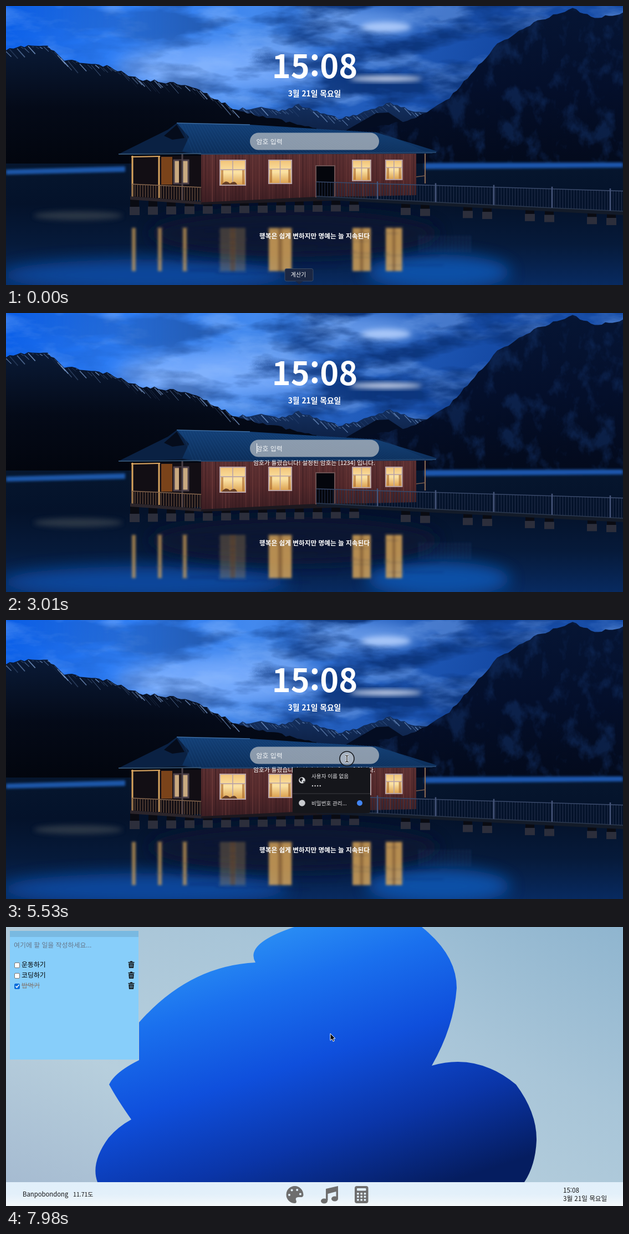
Write an HTML page that moves like this. It is 1113x503 px and loops after 8 s.

```html
<!DOCTYPE html>
<html lang="ko">
<head>
<meta charset="utf-8">
<style>
html, body { margin: 0; width: 100%; height: 100%; overflow: hidden; background: #061428; }
svg { position: absolute; left: 0; top: 0; width: 1113px; height: 503px; will-change: transform; }
text { font-family: "Noto Sans CJK KR", "Noto Sans KR", "Noto Sans", sans-serif; }
</style>
</head>
<body>
<svg id="photo" viewBox="0 0 1113 503" xmlns="http://www.w3.org/2000/svg"></svg>
<svg id="stage" viewBox="0 0 1113 503" xmlns="http://www.w3.org/2000/svg"></svg>
<script>
const LOOP = 8000, STEP = 70, LOGIN = 6860;
const KEY_GAP = 210, KEYS = 4;

let seed = 11;
const rnd = () => (seed = (seed * 16807) % 2147483647) / 2147483647;
const range = (n, fn) => Array.from({ length: n }, (_, i) => fn(i)).join('');
const lerp = (a, b, p) => a + (b - a) * p;
const rect = (x, y, w, h, fill, more = '') =>
  `<rect x="${x}" y="${y}" width="${w}" height="${h}" fill="${fill}" ${more}/>`;
const poly = (pts, fill, more = '') => `<polygon points="${pts}" fill="${fill}" ${more}/>`;
const path = (d, fill, more = '') => `<path d="${d}" fill="${fill}" ${more}/>`;
const line = (x1, y1, x2, y2, stroke, w = 1, more = '') =>
  `<path d="M${x1} ${y1}L${x2} ${y2}" stroke="${stroke}" stroke-width="${w}" ${more}/>`;
const ellipse = (x, y, rx, ry, fill, more = '') =>
  `<ellipse cx="${x}" cy="${y}" rx="${rx}" ry="${ry}" fill="${fill}" ${more}/>`;
const circle = (x, y, r, fill, more) => ellipse(x, y, r, r, fill, more);
const text = (str, x, y, size, fill = '#fff', more = '') =>
  `<text x="${x}" y="${y}" font-size="${size}" fill="${fill}" ${more}>${str}</text>`;

const gradient = (id, dir, ...stops) => `<linearGradient id="${id}" ${dir}>` +
  stops.map((c, i) => `<stop offset="${i / (stops.length - 1)}" stop-color="${c}"/>`).join('') + '</linearGradient>';
const blur = (id, s) =>
  `<filter id="${id}" x="-50%" y="-50%" width="200%" height="200%"><feGaussianBlur stdDeviation="${s}"/></filter>`;
// Paints noise of one colour inside the filtered shape.
const noise = (id, freq, n, color, gain, bias) =>
  `<filter id="${id}" x="0" y="0" width="100%" height="100%" color-interpolation-filters="sRGB">
    <feTurbulence type="fractalNoise" baseFrequency="${freq}" numOctaves="5" seed="${n}"/>
    <feColorMatrix values="0 0 0 0 0 0 0 0 0 0 0 0 0 0 0 ${gain} 0 0 0 ${-bias}" result="a"/>
    <feFlood flood-color="${color}"/><feComposite operator="in" in2="a"/>
    <feComposite operator="in" in2="SourceGraphic"/></filter>`;

const DOWN = 'x2="0" y2="1"', ACROSS = 'x2="1"';
const photoDefs = `<defs>
  ${gradient('sky', 'x2="1" y2=".12"', '#0a5ee8', '#2d7cf3', '#4389ee', '#2460c0', '#164ba6', '#184ea8')}
  ${gradient('cloudy', ACROSS, '#0000', '#0004', '#000a', '#000', '#000d', '#0008')}
  ${gradient('slopeL', DOWN, '#0a1a36', '#040a18', '#02050d')}
  ${gradient('slopeR', DOWN, '#061534', '#040f2b', '#030a1c')}
  ${gradient('far', DOWN, '#14305f', '#050f28')}
  ${gradient('lake', DOWN, '#06162e', '#04122a', '#061a3a', '#082a60')}
  ${gradient('roof', DOWN, '#134077', '#0c2e5a')}
  ${gradient('wall', DOWN, '#5b3032', '#54292b', '#3c1e23')}
  ${gradient('pane', DOWN, '#f2c478', '#fbe2a4', '#dba04e')}
  ${blur('soft', 14)}${blur('mid', 5)}${blur('fine', 2)}
  ${noise('darkCloud', '.006 .017', 8, '#0c357c', 4.5, 1.9)}
  ${noise('lightCloud', '.008 .022', 21, '#9cc4ff', 4, 1.9)}
  ${noise('rock', '.03 .02', 5, '#14346c', 4, 2)}
</defs>`;

// Breaks a coarse outline "x,y x,y ..." into a jagged one.
function ridge(outline, rough = 5) {
  const pts = outline.split(' ').map(p => p.split(',').map(Number));
  return pts.slice(1).reduce((out, [bx, by], i) => {
    const [ax, ay] = pts[i], n = Math.ceil((bx - ax) / 7);
    for (let k = 1; k <= n; k++)
      out.push([lerp(ax, bx, k / n), lerp(ay, by, k / n) + (rnd() - .5) * rough]);
    return out;
  }, [pts[0]]);
}
const snow = (pts, fall) => pts.map(([x, y]) => {
  const d = rnd() * fall;
  return line(x, y + 2, x + 3 + d * .7, y + 2 + d, '#86a9dc', .6 + rnd() * 1.3, `opacity="${rnd() * .75}"`);
}).join('');
const rocky = (pts, fill) => poly(pts, fill) + poly(pts, '#000', 'filter="url(#rock)" opacity=".5"');
const glow = (x, y, rx, ry, fill, opacity, size = 'soft') =>
  ellipse(x, y, rx, ry, fill, `opacity="${opacity}" filter="url(#${size})"`);

function landscape() {
  const left = ridge('0,80 40,71 75,73 105,97 182,109 240,132 330,142 415,187 560,222');
  const far = ridge('400,187 467,182 492,190 528,178 600,203 652,191 693,173 738,192 820,188');
  const right = ridge('630,226 738,203 800,166 852,108 886,69 952,30 1022,4 1062,22 1113,13', 4);
  return rect(0, 0, 1113, 300, 'url(#sky)') +
    glow(390, 110, 190, 42, '#80b1ff', .8) + glow(640, 30, 110, 24, '#7fadf5', .7) +
    rect(0, 0, 1113, 230, '#0005', 'filter="url(#lightCloud)"') +
    rect(0, 0, 1113, 230, 'url(#cloudy)', 'filter="url(#darkCloud)"') +
    glow(685, 38, 45, 9, '#bcd5ff', .8, 'mid') + glow(685, 131, 65, 5, '#eaf0ff', .9, 'mid') +
    poly(far.join(' ') + ' 820,290 400,290', 'url(#far)') + snow(far, 14) +
    poly('600,232 668,193 690,192 735,222 760,260 600,260', '#040d22') +
    rocky(right.join(' ') + ' 1113,284 600,284', 'url(#slopeR)') +
    poly(left.join(' ') + ' 560,296 0,296', 'url(#slopeL)') + snow(left.slice(0, 62), 22) +
    rect(0, 284, 1113, 219, 'url(#lake)') +
    poly('0,295 215,289 215,299 0,304', '#1f57a8', 'filter="url(#fine)"') +
    poly('755,283 1113,282 1113,291 755,294', '#1c57ad', 'filter="url(#fine)"') +
    glow(250, 485, 260, 28, '#0d4da8', .85) + glow(780, 480, 130, 32, '#0a55b0', .9) +
    glow(130, 378, 80, 8, '#3a4450', .7, 'mid') + glow(520, 410, 260, 42, '#0d1430', .85);
}

const WINDOWS = [386, 474, 625, 685].map(x => ({ x, w: 46 - (x - 386) * .055, h: 45 - (x - 386) * .034 }));

function windowAt({ x, w, h }) {
  const y = 278, frame = '#b9a3a6';
  return rect(x, y, w, h, 'url(#pane)', `stroke="${frame}" stroke-width="2"`) +
    line(x, y + h * .38, x + w, y + h * .38, frame, 1.6) + line(x + w / 2, y, x + w / 2, y + h, frame, 1.6) +
    [2, w - 6].map(dx => rect(x + dx, y + h * .4, 4, h * .56, '#a8672b', 'opacity=".6"')).join('');
}

function house() {
  const deckY = x => 343 + (x - 560) * .049;
  const railY = x => 317 + (x - 560) * .03;
  const pillar = (x, y, h) => rect(x - 8, y, 16, h * .5, '#0a0b12') + rect(x - 9, y + h * .5, 18, h * .5, '#2c2e3b');

  return range(13, i => pillar(232 + i * 33, 347, 30 - i * .6)) +
    // porch
    rect(226, 270, 128, 80, '#120e14') + rect(280, 272, 20, 50, '#7a431a') +
    rect(303, 278, 26, 42, '#c9a980', 'stroke="#4d4049" stroke-width="3"') + line(315, 278, 315, 320, '#2a1c1c', 6) +
    line(226, 272, 278, 271, '#e0aa63', 2) + [228, 276].map(x => line(x, 270, x, 346, '#d7a45e', 3)).join('') +
    line(318, 266, 318, 352, '#4a4048', 3) + line(226, 321, 352, 327, '#8a6a50', 1.5) +
    range(27, i => line(228 + i * 4.7, 321 + i * .22, 228 + i * 4.7, 343 + i * .36, '#6b503f', 1.2)) +
    poly('224,343 354,353 354,358 224,349', '#2b252b') +
    // wall
    poly('352,266 740,263 740,341 560,345 352,355', 'url(#wall)') +
    range(64, i => line(354 + i * 6.05, 267, 354 + i * 6.05, 354 - i * .2, rnd() < .6 ? '#32191e' : '#7d4542', .6 + rnd(), `opacity="${.3 + rnd() * .5}"`)) +
    poly('352,354 560,344 650,343 650,349 352,358', '#1c181f') +
    WINDOWS.map(windowAt).join('') +
    path('M389 322q8-10 15-2q9-7 13 2z', '#684027') +
    rect(559, 288, 34, 56, '#04060c', 'stroke="#6d5152" stroke-width="2"') +
    line(756, 264, 756, 320, '#8d6c55', 2) + line(740, 308, 756, 306, '#7a5c4c', 1.5) +
    // roof
    poly('203,267 292,223 308,211 345,236 352,268 318,264', '#0a2143') + poly('285,234 308,214 322,238 300,241', '#050c1b') +
    poly('308,211 440,214 668,228 720,244 778,262 768,266 352,268 318,262 330,236', 'url(#roof)') +
    range(70, i => line(316 + i * 5.2, 212 + i * .22, 338 + i * 6.1, 265, '#2a5f99', .8, 'opacity=".35"')) +
    line(308, 211, 440, 214, '#3c6ca2', 1.5) + line(203, 267, 352, 266, '#315070', 2) + line(352, 267, 776, 264, '#24446c', 2) +
    // pier
    range(8, i => { const x = 721 + Math.floor(i / 2) * 112 + i % 2 * 35; return pillar(x, deckY(x), 26); }) +
    poly(`560,342 1113,${deckY(1113)} 1113,${deckY(1113) + 7} 560,349`, '#131b29') +
    range(110, i => { const x = 560 + i * 5.05; return line(x, railY(x), x, deckY(x), '#222f4a', 1.1); }) +
    line(560, railY(560), 1113, railY(1113), '#39496a', 1.6) + line(560, deckY(560), 1113, deckY(1113), '#2a3850', 1.5) +
    range(5, i => { const x = 670 + i * 105; return line(x, railY(x) - 4, x, deckY(x), '#46557a', 2.5); });
}

function reflections() {
  const streak = (x, w, opacity) => rect(x, 400, w, 78, '#e0ab58', `opacity="${opacity}"`);
  return '<g filter="url(#fine)">' +
    [227, 274, 319].map(x => streak(x, 7, .65)).join('') +
    WINDOWS.map(({ x, w }, i) => streak(x, w, i ? .8 : .25) + rect(x + w * .4, 400, w * .2, 78, '#694629', 'opacity=".5"')).join('') +
    range(15, i => rect(745 + i * 6.5, 414, 2, 30, '#234c86', 'opacity=".45"')) +
    range(26, i => rect(215 + rnd() * 480, 395 + i * 3.6, 40 + rnd() * 70, 1, '#0b2047', 'opacity=".4"')) + '</g>';
}

const bold = 'font-weight="700"', medium = 'font-weight="500"', centred = 'text-anchor="middle"';
const DATE = '3월 21일 목요일';

const lockScreen = `<g id="lock">
  ${text('15:08', 557, 130, 57.5, '#fff', `${bold} ${centred}`)}
  ${text(DATE, 556.5, 163, 13.8, '#fff', `${bold} ${centred}`)}
  ${text('행복은 쉽게 변하지만 명예는 늘 지속된다', 556.5, 418.5, 11.7, '#fff', `${bold} ${centred}`)}
  ${rect(440, 228.5, 233, 31, '', 'id="field" rx="15.5"')}
  ${text('암호 입력', 451.5, 249, 11.9, '#f4f6f8', 'id="hint"')}
  <g id="dots">${range(KEYS, i => circle(455 + i * 5.7, 244, 2.3, '#fff'))}</g>
  ${rect(0, 235, 1, 18, '#fff', 'id="caret"')}
  ${text('암호가 틀렸습니다! 설정된 암호는 [1234] 입니다.', 556, 273.5, 10.7, '#fff', `id="error" ${centred}`)}
  <g id="popup">
    ${rect(517, 266, 140, 82, '#15161b', 'rx="3"')}${line(517, 313, 657, 313, '#3c3d43')}
    ${circle(534, 289, 5.8, '#d6d8db')}${path('M530 286q4-3 5 0t-2 3l1 3q-5-1-4-6zM536 291l3-1-2 4z', '#15161b')}
    ${text('사용자 이름 없음', 551, 285, 9.6, '#e6e6e8')}
    ${range(KEYS, i => circle(553 + i * 4.6, 299, 1.2, '#d0d0d3'))}
    ${circle(534, 330, 5.8, '#c9cbcf')}${text('비밀번호 관리...', 551, 334, 9.6, '#e6e6e8')}
    ${circle(638, 330, 5, '#4285f4')}
  </g>
  <g id="tip">${rect(503, 473.5, 51, 22.5, '#1b2743', 'rx="3" stroke="#46536c" stroke-width=".8"')}
    ${path('M522 496H536L529 502Z', '#1b2743')}${text('계산기', 527.5, 488, 9.9, '#fff', centred)}</g>
</g>`;

const trash = y => `<g transform="translate(226 ${y})">` +
  path('M-5.5-5h3l1-1.5h3l1 1.5h3v1.5h-11zM-4.7-2.5h9.4l-.7 8.5h-8z', '#111') +
  [-2, 0, 2].map(x => line(x, -1, x, 4.5, '#87cefa', .8)).join('') + '</g>';

function todo(label, y, done) {
  const ink = done ? '#0b6fdc' : '#767676';
  return rect(15.5, y - 3.5, 9, 9, done ? ink : '#fff', `rx="1.5" stroke="${ink}"`) +
    (done ? path(`M17.5 ${y + .5}l2 2.5 4-5`, 'none', 'stroke="#fff" stroke-width="1.5"') : '') +
    text(label, 28, y + 3.5, 11.9, done ? '#808080' : '#000', `${medium} ${done ? 'text-decoration="line-through"' : ''}`) +
    trash(y);
}

const ICON = '#6e6e6e', BAR = '#e3f0fa';
const desktop = `<defs>
    ${gradient('wallpaper', 'y1="1" x2="1" y2="0"', '#a3b8cf', '#b7cfdd', '#a8c5d8', '#8fb5cf')}
    ${gradient('blue', 'x1=".25" x2=".8" y2="1"', '#3099f7', '#1a70ee', '#0f4fdc', '#0a35a8', '#051d60')}
    ${gradient('bar', DOWN, '#e1effa', '#e3f0fa', '#f4f8fb')}
  </defs>
  <g id="desktop">${rect(0, 0, 1113, 503, 'url(#wallpaper)')}
  ${path('M240 172Q330 70 450 64Q430 30 520 0H750Q813 50 813 110Q808 180 768 250Q850 226 920 284Q958 335 957 385Q955 430 935 460H165Q152 425 185 380Q202 360 226 347Q200 310 186 284Q196 262 240 240Z', 'url(#blue)')}
  ${rect(7, 7, 232, 232, '#87cefa')}${rect(7, 7, 232, 11, '#79b9e1')}
  ${text('여기에 할 일을 작성하세요...', 14, 37, 11.9, '#66778a', medium)}
  ${todo('운동하기', 68)}${todo('코딩하기', 87)}${todo('밥먹기', 106, true)}
  ${rect(0, 460, 1113, 43, 'url(#bar)')}
  ${text('Banpobondong', 30, 486, 11.3, '#111', medium)}${text('11.71도', 121, 486, 10.6, '#111', medium)}
  ${path('M521 467a15.5 15.5 0 1 0 0 31c4 0 3-4 2-6c-1-4 2-5 5-5h5c2 0 3.5-2 3.5-4c0-9-7-16-15.5-16z', ICON)}
  ${range(4, i => circle(521 - 10 * Math.cos(i), 483 - 10 * Math.sin(i), 2, BAR))}
  ${path('M577 472L599 467V490H595.5V477L580.5 481V493H577Z', ICON)}
  ${ellipse(574, 494, 6, 4.5, ICON)}${ellipse(593, 490, 6, 4.5, ICON)}
  ${rect(629, 467, 24.5, 31, ICON, 'rx="4"')}${rect(633, 471, 16.5, 4.5, BAR, 'rx="1"')}
  ${range(9, i => rect(633 + i % 3 * 6.3, 479 + Math.floor(i / 3) * 5.6, 3.7, 3.5, BAR, 'rx="1"'))}
  ${text('15:08', 1005, 478.5, 11.6, '#111', medium)}${text(DATE, 1005, 493.5, 11.6, '#111', medium)}
</g>`;

const IBEAM = 'M-3-6q3 0 3 2q0-2 3-2M0-4V4M-3 6q3 0 3-2q0 2 3 2';
const pointer = `<g id="pointer">
  ${circle(0, 0, 13, '#cfd6de', 'id="ring" fill-opacity=".4" stroke="#15181d" stroke-width="1.6"')}
  <g id="ibeam">${path(IBEAM, 'none', 'stroke="#fff" stroke-width="2.8"')}${path(IBEAM, 'none', 'stroke="#111" stroke-width="1.2"')}</g>
  ${path('M0 0V12.5L3 9.8L5 14.3L7.3 13.3L5.3 9H9Z', '#000', 'id="arrow" stroke="#fff" stroke-width="1"')}
</g>`;

const $ = id => document.getElementById(id);
$('photo').innerHTML = photoDefs + landscape() + house() + reflections();
$('stage').innerHTML = lockScreen + desktop + pointer;

const show = (id, on) => $(id).setAttribute('visibility', on ? 'visible' : 'hidden');
const within = (t, a, b) => t >= a && t < b;

// The pointer is seen from show to hide and moves from start to end; bow bends the way.
const GLIDES = [
  { show: 840, start: 840, end: 1120, hide: 1960, from: [545, 490], to: [600, 246], bow: [0, 0] },
  { show: 3640, start: 3920, end: 5250, hide: 5880, from: [582, 248], to: [615, 250], bow: [70, 70] },
  { show: 7630, start: 7840, end: 7980, hide: LOOP, from: [611, 234], to: [585, 192], bow: [0, 0] }
];
const WORDS = [[1960, 2870], [5880, LOGIN]];

function pointerAt(t) {
  const g = GLIDES.find(g => within(t, g.show, g.hide));
  if (!g) return null;
  const p = Math.min(1, Math.max(0, (t - g.start) / (g.end - g.start)));
  const eased = p * p * (3 - 2 * p);
  return g.from.map((a, i) => lerp(a, g.to[i], eased) + g.bow[i] * Math.sin(Math.PI * eased));
}

function draw(time) {
  const t = Math.floor(time % LOOP / STEP) * STEP;
  const locked = t < LOGIN;
  const word = WORDS.find(([a, b]) => within(t, a, b));
  const count = word ? Math.min(KEYS, 1 + Math.floor((t - word[0]) / KEY_GAP)) : 0;

  $('lock').style.display = locked ? '' : 'none';
  $('desktop').style.display = locked ? 'none' : '';
  $('tip').setAttribute('opacity', Math.max(0, 1 - t / 350));
  $('field').setAttribute('fill', within(t, 1960, 2870) ? 'rgba(165,180,205,.75)' : 'rgba(187,193,199,.72)');
  show('hint', !count);
  [...$('dots').children].forEach((d, i) => d.setAttribute('opacity', i < count ? 1 : 0));
  show('caret', word || within(t, 1400, 1750) || within(t, 2870, 4480) || within(t, 5740, 5880));
  $('caret').setAttribute('x', 452 + count * 5.65);
  show('error', t >= 2870);
  show('popup', within(t, 1470, 1960) || within(t, 5460, 5880));

  const pos = pointerAt(t);
  $('pointer').style.display = pos ? '' : 'none';
  if (!pos) return;
  const [x, y] = pos, overField = locked && within(x, 440, 673) && within(y, 228, 260);
  $('pointer').setAttribute('transform', `translate(${x} ${y})`);
  show('ibeam', overField);
  show('arrow', !overField);
  show('ring', within(t, 1400, 1540) || within(t, 5390, 5740));
}

function tick() {
  draw(performance.now());
  requestAnimationFrame(tick);
}
tick();
</script>
</body>
</html>
```
